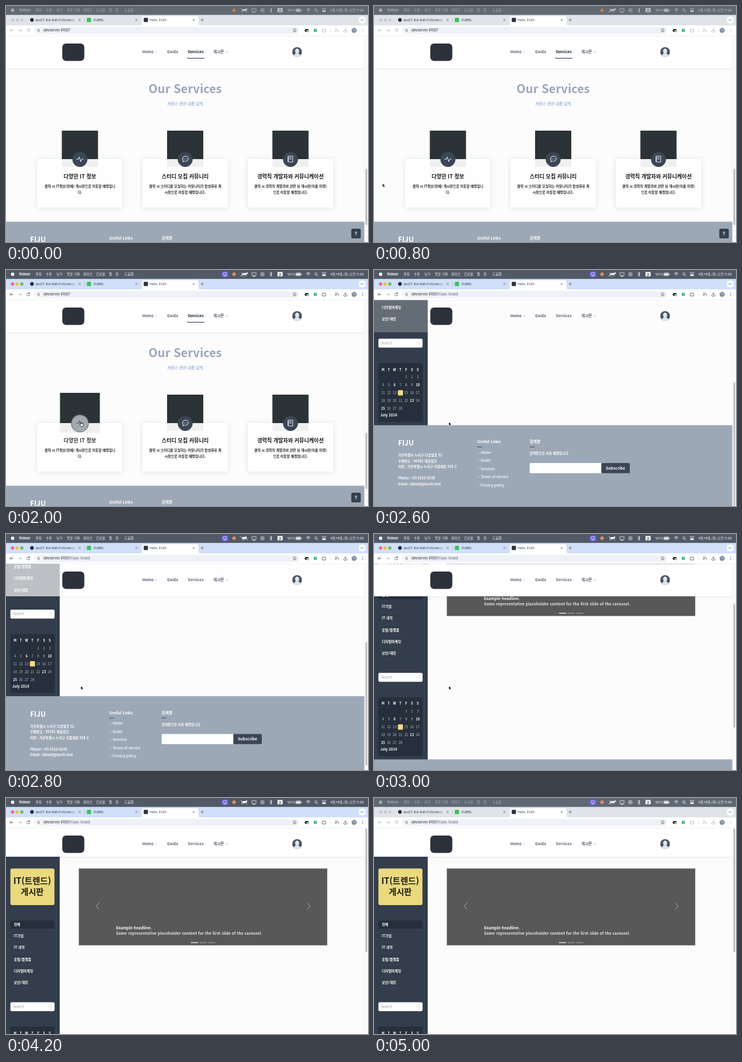
Recreate the animation shown at these times as an HTML page. Size 600 by 390 pixels, loop 5100 ms.

```html
<!DOCTYPE html>
<html lang="ko">
<head>
<meta charset="utf-8">
<title>Services</title>
<style>
html, body { margin: 0; width: 100%; height: 100%; overflow: hidden; background: #fff; }
svg { display: block; width: 600px; height: 390px; }
text { font-family: "Noto Sans CJK KR", "Noto Sans CJK", "Noto Sans", sans-serif; white-space: pre; }
.ui text { font-family: Inter, "Noto Sans CJK KR", sans-serif; }
.b { font-weight: 700; }
.m { text-anchor: middle; }
.line { fill: none; stroke-linecap: round; stroke-linejoin: round; }
.anim, .step { animation: 5.1s linear infinite; }
.step { animation-timing-function: step-end; }

.home { animation-name: home; }
.board { animation-name: board; }
@keyframes home { 0% { visibility: visible } 48.8%, 100% { visibility: hidden } }
@keyframes board { 0% { visibility: hidden } 48.8%, 100% { visibility: visible } }

.scroll { animation-name: scroll; }
@keyframes scroll {
  0%, 53.14% { transform: translateY(var(--far)); animation-timing-function: cubic-bezier(.455,.03,.515,.955) }
  64.51%, 100% { transform: none }
}
.head { animation-name: head; }
@keyframes head {
  0%, 48.79% { opacity: 1; height: 53px }
  48.8% { opacity: 0; height: 53px }
  57.84%, 64.5% { opacity: 1; height: 53px }
  67.5%, 100% { opacity: 1; height: 47px }
}

/* window focus */
.bar { animation-name: bar; }
.strip { animation-name: strip; }
.focus { animation-name: focus; }
.menu { animation-name: menu; }
.tray { animation-name: tray; }
.share { animation-name: share; }
@keyframes bar { 0%, 100% { fill: #616a72 } 31.2% { fill: #505965 } 95.9% { fill: #5f6873 } }
@keyframes strip { 0%, 95.9%, 100% { fill: #e0e4e9 } 31.2% { fill: #d1dff8 } }
@keyframes focus { 0%, 95.9%, 100% { opacity: 0 } 31.2% { opacity: 1 } }
@keyframes menu { 0%, 95.9%, 100% { opacity: .45 } 31.2% { opacity: 1 } }
@keyframes tray { 0% { opacity: .6 } 31.2%, 100% { opacity: 1 } }
@keyframes share { 0% { opacity: 0 } 31.2%, 100% { opacity: 1 } }
.run { animation: run .3s step-end infinite; transform-origin: 395px 7px; }
@keyframes run { 0% { transform: skewX(0) } 33.3% { transform: skewX(28deg) } 66.6% { transform: skewX(-28deg) } }

/* hovered card */
.art.anim { animation-name: art; transform-origin: 122.5px 236px; }
.disc.anim { animation-name: disc; transform-origin: 122.5px 253.5px; }
.glyph.anim { animation-name: glyph; }
.name.anim { animation-name: name; }
@keyframes art { 0%, 31.2% { transform: none } 37%, 100% { transform: scale(1.1) } }
@keyframes disc {
  0%, 31.2% { transform: none; fill: #3b4656; stroke: #3b4656 }
  37%, 100% { transform: scale(1.17); fill: #a3a9b0; stroke: #6a7481 }
}
@keyframes glyph { 0%, 31.2% { stroke: #fff } 37%, 100% { stroke: #3b4656 } }
@keyframes name { 0%, 31.2% { fill: #15181c } 37%, 100% { fill: #36393e } }

.cursor { animation-name: cursor; }
@keyframes cursor {
  0%, 13.7% { transform: translate(-12px, 302px) }
  15.7% { transform: translate(14px, 293px); animation-timing-function: ease-out }
  23.5%, 30% { transform: translate(120.5px, 255px) }
  36%, 73.5% { transform: translate(124px, 251px); animation-timing-function: ease-in }
  78%, 100% { transform: translate(-12px, 250px) }
}
.arrow { animation-name: arrow; }
.hand { animation-name: hand; }
@keyframes arrow { 0%, 48.8%, 100% { opacity: 1 } 33% { opacity: 0 } }
@keyframes hand { 0%, 48.8%, 100% { opacity: 0 } 33% { opacity: 1 } }
</style>
</head>
<body>
<svg id="stage" viewBox="0 0 600 390"></svg>
<script>
// Text placed by its vertical centre.
const t = (x, y, s, size, fill, cls = '') =>
  `<text x="${x}" y="${(y + size * .36).toFixed(2)}" font-size="${size}" fill="${fill}" class="${cls}">${s}</text>`;
const r = (x, y, w, h, fill, rx = 0, more = '') =>
  `<rect x="${x}" y="${y}" width="${w}" height="${h}" rx="${rx}" fill="${fill}" ${more}/>`;
const c = (x, y, rad, fill, more = '') => `<circle cx="${x}" cy="${y}" r="${rad}" fill="${fill}" ${more}/>`;
const p = (d, stroke, w = .8, cls = '') => `<path class="line ${cls}" d="${d}" stroke="${stroke}" stroke-width="${w}"/>`;
const g = (cls, body) => `<g class="${cls}">${body}</g>`;
const each = (list, fn) => list.map(fn).join('');

const DARK = '#3b4656', NIGHT = '#262f3b', PAGE = '#fcfcfd', W = '#fff';
const BRAND = 'FIJU', HOST = 'devserver:41007';

const defs = `<defs>
  <filter id="soft" x="-20%" y="-20%" width="140%" height="150%">
    <feDropShadow dx="0" dy="1" stdDeviation="4" flood-color="#3b4656" flood-opacity=".13"/></filter>
  <filter id="edge" x="-2%" y="-10%" width="104%" height="130%">
    <feDropShadow dx="0" dy=".6" stdDeviation="1.4" flood-color="#3b4656" flood-opacity=".12"/></filter>
  <linearGradient id="fade"><stop offset=".85" stop-color="#fff"/><stop offset="1" stop-color="#000"/></linearGradient>
  <mask id="cut">${r(48, 15, 68, 17, 'url(#fade)')}</mask>
  <clipPath id="view">${r(0, 49.5, 600, 341, '#000')}</clipPath>
  <g id="foot">${footer()}</g>
</defs>`;

function footer() {
  const info = ['가온특별시 누리구 다솜빛로 52', '우편번호 : 99381 해윰빌딩',
    '지번 : 가온특별시 누리구 하람새동 918-2', '', 'Phone: +99 5550-0199', 'Email: inbox@placeh.test'];
  const links = ['Home', 'Guide', 'Services', 'Terms of service', 'Privacy policy'];
  return r(0, -.5, 594, 140, '#9ca8b6')
    + t(40, 29, BRAND, 11.6, W, 'b')
    + each(info, (s, i) => t(40, 49 + i * 9.55, s, 5.6, W, 'b'))
    + t(171, 27, 'Useful Links', 6.5, W, 'b') + r(171, 35, 8, 1, DARK)
    + each(links, (s, i) => {
      const y = 44.5 + i * 13.5;
      return p(`M172.5 ${y - 1.5}l1.5 1.5l-1.5 1.5`, '#dfe5ec', .6) + t(176.7, y, s, 5.7, '#eef1f5', 'b');
    })
    + t(258, 27, '검색창', 6.5, W, 'b') + r(258, 35, 8, 1, DARK)
    + t(258, 46, '검색창으로 사용 예정입니다.', 5.5, W, 'b')
    + r(258, 62, 120, 16.7, W, 1.5) + r(376.7, 62, 47.3, 16.7, DARK, 1.5)
    + t(400.3, 70.3, 'Subscribe', 6.6, W, 'b m');
}

function card(x, i) {
  const live = i ? '' : 'anim';
  const names = ['다양한 IT 정보', '스터디 모집 커뮤니티', '경력직 개발자와 커뮤니케이션'];
  const notes = [
    ['클릭 시 IT정보(전체) 게시판으로 이동할 예정입니', '다.'],
    ['클릭 시 스터디를 모집하는 커뮤니티가 활성화된 게', '시판으로 이동할 예정입니다.'],
    ['클릭 시 경력직 개발자와 관련 된 게시판(이름 미정)', '으로 이동할 예정입니다.']];
  const icons = ['m-5.3 .3h2.5l1.8-4l2.4 8l1.8-4.3h2.2',
    'm-3.7 4.2l.2-2.2a4.9 4.3 0 1 1 2.1 1.4zm1.3-4.5h.4m1.9 0h.4m1.9 0h.4',
    'm-3.4-4.8h7.2v9.6h-7.2zm-1.3 2.4h2m-2 2.4h2m-2 2.4h2m1.2-4.6h2.8m-2.8 2.2h2.8'];
  return r(x - 30, 206, 60, 60, '#2b3336', 0, `class="art ${live}"`)
    + r(x - 70.5, 253, 141, 80, W, 3, 'fill-opacity=".92" filter="url(#soft)"')
    + c(x, 253.5, 12, DARK, `class="disc ${live}" stroke="${DARK}"`)
    + p(`M${x} 253${icons[i]}`, W, .9, `glyph ${live}`)
    + t(x, 281.7, names[i], 8.8, '#15181c', `b m name ${live}`)
    + each(notes[i], (s, k) => t(x, 298 + k * 9.7, s, 5.7, '#22262b', 'b m'));
}

const home = g('step home', r(0, 49, 600, 341, PAGE)
  + t(297, 137, 'Our Services', 19.5, '#9ca8b8', 'b m')
  + t(297, 161.5, '서비스 관련 내용 입력', 6.5, '#6f8cc4', 'm')
  + each([122.5, 297, 471.5], card)
  + '<use href="#foot" y="357"/>'
  + r(572.3, 368, 15.7, 16, '#343f4f', 2) + p('M580.1 379v-6m-2 2l2-2l2 2', W));

function sidebar() {
  const items = ['전체', 'IT기업', 'IT·과학', '포털/플랫폼', '디지털마케팅', '보안/해킹'];
  const col = i => 15 + i * 9.58;
  const bright = [6, 10, 23, 25];
  const days = Array.from({ length: 28 }, (_, i) => i + 1);
  return r(0, 90, 89, 392, '#333d4b')
    + r(7.3, 116.5, 73, 60.5, '#ead97d', 3)
    + t(43.5, 136.5, 'IT(트렌드)', 14, '#1c1c1c', 'b m') + t(43.5, 155.5, '게시판', 13.8, '#1c1c1c', 'b m')
    + r(7.5, 202.5, 72.8, 13.5, NIGHT, 1)
    + each(items, (s, i) => t(13, 209 + i * 19.2, s, 5.8, W, 'b')
      + (i ? r(8, 218 + i * 19.2, 72, .5, '#3f4958') : ''))
    + r(7.3, 337.5, 73.2, 14.7, W, 2) + t(11.5, 344.8, 'Search', 5.9, '#9a9fa6')
    + c(73.5, 344, 1.9, 'none', 'stroke="#cfcfcf" stroke-width=".6"') + p('M75 345.5l1.7 1.7', '#cfcfcf', .6)
    + r(7.3, 378, 73.2, 97, NIGHT, 1.5)
    + each([...'MTWTFSS'], (s, i) => t(col(i), 388.5, s, 5.6, W, 'b m'))
    + r(39.5, 422.5, 8.6, 9, '#e6d376', 1.5)
    + each(days, d => {
      const n = d + 3, on = bright.includes(d);
      return t(col(n % 7), 401.2 + Math.floor(n / 7) * 12.95, d, 5.6,
        on || d === 14 ? W : '#b9c0c9', on ? 'b m' : 'm');
    })
    + t(10.3, 464.3, 'July 2014', 5.9, W, 'b');
}

const board = g('step board', r(0, 49, 600, 341, PAGE)
  + '<g class="anim scroll" style="--far:-224px">' + sidebar()
  + r(120.7, 116.5, 411.7, 127, '#585858')
  + p('M154 174l-4.6 4.7l4.6 4.7M499.4 174l4.6 4.7l-4.6 4.7', '#bcbcbc', .9)
  + t(182.3, 214.6, 'Example headline.', 6.55, W, 'b')
  + t(182.3, 224, 'Some representative placeholder content for the first slide of the carousel.', 6.55, '#e2e2e2', 'b')
  + each([306.5, 320.7, 335], (x, i) => r(x, 238.4, 12, 1.2, i ? '#a0a0a0' : W))
  + '<use href="#foot" y="481"/></g>');

const caret = x => p(`M${x - 1.6} 75.5l1.6 1.6l1.6-1.6`, '#8b929c', .6);
const header = r(0, 50, 594, 53, W, 0, 'class="anim head" filter="url(#edge)"')
  + r(93.3, 62, 36.5, 28.8, '#2b323c', 6)
  + each([['Home', 226], ['Guide', 267], ['Services', 301.3], ['게시판', 343.5]],
    ([s, x]) => t(x, 76, s, 6.4, '#596170', 'b'))
  + caret(249) + caret(366)
  + g('step home', t(301.3, 76, 'Services', 6.4, DARK, 'b') + r(300, 85.7, 29, 1.2, '#50536f', .6))
  + c(482.5, 76, 8, '#4a5568')
  + '<ellipse cx="482.5" cy="74.6" rx="3.3" ry="4.2" fill="#e4e8ee"/>'
  + '<path d="M477 81.8q.8-2.6 4-3.2h3q3.2 .6 4 3.2a8 8 0 0 1-11 0z" fill="#e4e8ee"/>';

const thumb = (y, h) => r(595.7, y, 3, h, '#bfbfbf', 1.5);
const scrollbar = r(594, 49.5, 6, 341, '#fafafa') + r(593.8, 49.5, .5, 341, '#e8e8e8')
  + g('step home', thumb(269, 93))
  + g('step board', `<g class="anim scroll" style="--far:135px">${thumb(50.5, 204)}</g>`);

function menuBar() {
  const words = [['파일', 49], ['수정', 66], ['보기', 83.5], ['방문 기록', 101], ['북마크', 128],
    ['프로필', 149.3], ['탭', 170.5], ['창', 181.5], ['도움말', 196.5]];
  const thin = 'stroke="#fff" stroke-width=".7"';
  return r(0, 0, 600, 15, '#616a72', 0, 'class="step bar"')
    + g('step menu', c(11, 7, 2.8, W) + t(21.5, 7.2, 'Velmor', 5.5, W, 'b')
      + each(words, ([s, x]) => t(x, 7.2, s, 5.4, W)))
    + g('step share', r(357.3, 2.2, 11, 9.8, '#6d5ce0', 2)
      + r(360, 4.8, 5.6, 3.8, 'none', .6, thin) + p('M361.5 10h2.6', W, .7))
    + g('step tray', c(378, 7, 3, '#d98b5f')
      + g('run', '<ellipse cx="395" cy="6.6" rx="4" ry="1.7" fill="#fff"/>' + c(398.5, 5.4, 1.5, W)
        + p('M392 7l-1.5 3m3-2l-.5 2m4.5-3l1.5 3m-8-4.5l-1.5-1', W))
      + r(407.5, 4.3, 7, 4.8, 'none', .8, thin) + p('M409 10.5h4', W)
      + c(425, 7, 3, 'none', thin) + '<path d="M424 5.5l2.6 1.5l-2.6 1.5z" fill="#fff"/>'
      + p('M437.5 5l3.5 4l-1.8 1.7v-7.4l1.8 1.7l-3.5 4', W, .7)
      + r(450, 3.3, 8.5, 7.2, W, 1.3) + t(454.2, 6.9, '한', 5, '#565f6c', 'b m')
      + t(466, 7.2, '100%', 4.9, W)
      + r(480, 4.8, 8.8, 4.6, 'none', 1.2, thin) + r(481, 5.8, 6.8, 2.6, W, .5) + r(489.5, 6.3, .8, 1.6, W)
      + p('M498 5.6q3-2.6 6 0m-4.8 1.7q1.8-1.5 3.6 0m-1.8 1.9h.1', W, .9)
      + c(513.5, 6.5, 2, 'none', thin) + p('M515 8l2 2', W)
      + r(524, 4, 6, 2.4, 'none', 1.2, thin) + r(524, 7.6, 6, 2.4, W, 1.2)
      + t(537.5, 7.2, '4월 18일 (목) 오전 11:58', 5.3, W));
}

const cross = x => p(`M${x - 1.4} 21.6l2.8 2.8m0-2.8l-2.8 2.8`, '#4a4f56', .6);
function tabs() {
  const ink = '#2f343a';
  return r(0, 14.7, 600, 18, '#e0e4e9', 0, 'class="step strip"')
    + each([11, 18.6, 26.2], x => c(x, 23, 2.6, '#c6cbd1'))
    + g('step focus', each([[11, '#f4605a'], [18.6, '#f6be3f'], [26.2, '#5ec454']], ([x, f]) => c(x, 23, 2.6, f)))
    + c(43, 23, 3, '#23282e')
    + `<g mask="url(#cut)">${t(49, 23, 'qm27-3rd-8uK-FIJU/setup/front', 5.2, ink)}</g>`
    + cross(122) + r(130, 20, .6, 6.5, '#a7b0bd')
    + r(134, 19.5, 7, 7, '#3dbf5b', 1) + t(145, 23, 'ZUMEL', 5.1, ink) + cross(216)
    + '<path d="M221 32.7q4 0 4-4v-7.7q0-4 4-4h86q4 0 4 4v7.7q0 4 4 4z" fill="#fff"/>'
    + r(228.3, 19.5, 7, 7, '#2b323c', 1) + t(238, 23, `Hello, ${BRAND}!`, 5.2, ink) + cross(311)
    + p('M323 23h4.4m-2.2-2.2v4.4', '#4a4f56', .7)
    + r(584.8, 17.6, 11, 11, W, 3.5, 'fill-opacity=".8"') + p('M588.5 22.3l1.8 1.8l1.8-1.8', '#4a4f56');
}

function toolbar() {
  const ink = '#4b5057';
  return r(0, 32, 600, 17.5, W) + r(0, 49.2, 600, .5, '#e3e6ea')
    + p('M20.5 40.3h5m-2.2-2.3l2.3 2.3l-2.3 2.3', '#b4b8bd')
    + r(47, 34.5, 439, 11.7, '#eef2f8', 5.85)
    + c(54, 40.3, 3.9, W) + c(54, 40.3, 2.1, 'none', `stroke="${ink}" stroke-width=".6"`)
    + p('M54 40.2v1m0-2.2v.1', ink, .6)
    + g('step home', t(62.3, 40.3, HOST, 5.6, '#24282d'))
    + g('step board', t(62.3, 40.3, `${HOST}<tspan fill="#5c6269">/topic-board</tspan>`, 5.6, '#24282d'))
    + p('M478.5 37.3l.9 2l2.1.2l-1.6 1.4l.5 2.1l-1.9-1.1l-1.9 1.1l.5-2.1l-1.6-1.4l2.1-.2z', ink, .6)
    + r(495.3, 37.9, 6.2, 4.9, '#30353b', .8) + r(498.3, 40.2, 2.4, 1.8, W)
    + r(510.2, 37.8, 5, 5, '#43b883')
    + r(537, 37.5, .6, 6, '#cfd8e6')
    + c(577, 40.3, 4.1, '#7b8ea3') + t(577, 40.3, '다윤', 2.9, W, 'm')
    + g('step menu', p('M11.8 40.3h-5m2.2-2.3l-2.3 2.3l2.3 2.3', ink)
      + p('M39.3 39a2.5 2.5 0 1 0 .2 2.2m-.1-3.8v1.8h-1.8', ink)
      + p('M524.6 38.5h1.5q.8-2 1.7 0h1.5v1.5q2 .8 0 1.7v1.3h-4.7z', ink)
      + p('M545.5 38.3h4.5m-4.5 1.9h4.5m-4.5 1.9h2.2m3.3-1.9v2.6', ink, .7)
      + p('M562.5 37.2v3.6m-1.6-1.5l1.6 1.6l1.6-1.6m-4.3 2.2v1.6h5.4v-1.6', ink)
      + each([38.2, 40.3, 42.4], y => c(591, y, .65, ink)));
}

const cursor = `<g class="anim cursor">
  <path class="step arrow" d="M0 0v6.3l1.5-1.4l1 2.3l1.2-.5l-1-2.2h2z" fill="#111" stroke="#fff" stroke-width=".6"/>
  <path class="step hand" d="M-.6 .6q.7-.8 1.3 0v2.2l2.6.6q1 .3 .9 1.3l-.6 2.9h-3.4l-2-2.7q-.3-1 .6-.8l.6.5z" fill="#fff" stroke="#111" stroke-width=".7"/>
</g>`;

document.getElementById('stage').innerHTML = defs
  + `<g clip-path="url(#view)">${home}${board}${header}${scrollbar}</g>`
  + g('ui', menuBar() + tabs() + toolbar()) + cursor;
</script>
</body>
</html>
```
